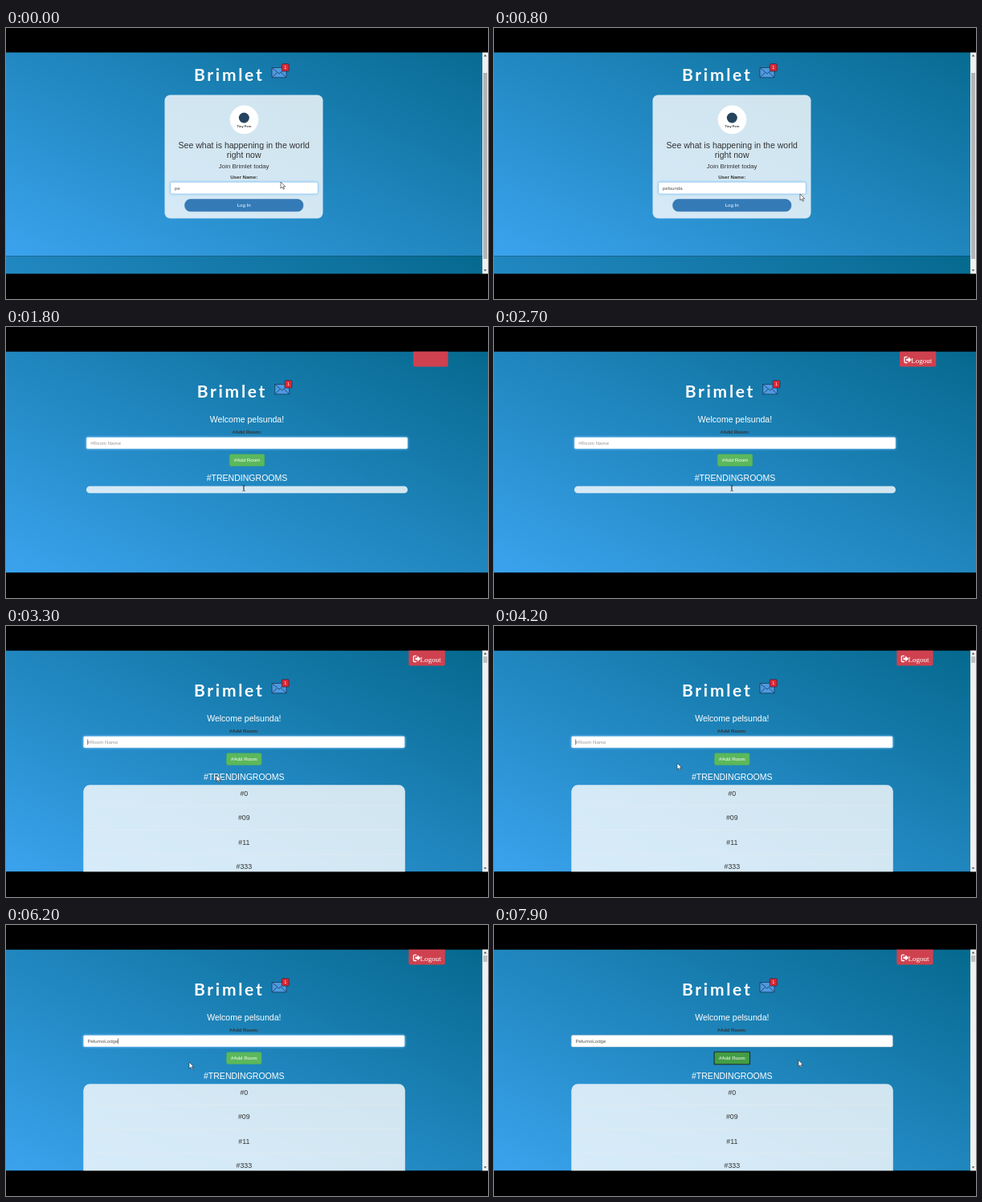
These frames come from a looping animation (600x338 px, 8 s). An HTML page:

```html
<!DOCTYPE html>
<html lang="en">
<head>
<meta charset="utf-8">
<title>Chat room sign-in</title>
<style>
  html, body { margin: 0; width: 100%; height: 100%; overflow: hidden; background: #000; }
  svg { display: block; width: 100vw; height: 100vh; }
  text { font-family: "Liberation Sans", Arial, sans-serif; font-size: 6.15px; fill: #333; }
  .mid { text-anchor: middle; }
  .bold { font-weight: 700; }
  .h3 { font-size: 10.54px; }
  .h4 { font-size: 7.9px; }
  .row { font-size: 8.8px; }
  .white { fill: #fff; }
  .brand { font: 700 21px Lato, sans-serif; letter-spacing: 2.7px; fill: #fff; }
  .logout { font: 9px "Liberation Serif", Times, serif; fill: #fff; }
  .panel { fill: #fff; fill-opacity: .8; }
  .field { fill: #fff; stroke: #ccc; stroke-width: .45; }
  .field.focus { stroke: #66afe9; filter: drop-shadow(0 0 1.4px rgba(130, 200, 250, .9)); }
  .value { fill: #555; }
  .value.empty { fill: #999; }
  .off { display: none; }
  #add rect { fill: #5cb85c; stroke: #4cae4c; stroke-width: .45; }
  #add.pressed rect { fill: #449d44; stroke: #255625; }
  #ring { fill: none; stroke: #1d2b22; stroke-width: .9; }
</style>
</head>
<body>
<svg viewBox="0 0 600 338">
  <defs>
    <linearGradient id="sky" x1="0" y1="1" x2="1" y2="0">
      <stop offset="0" stop-color="#3ba3ee"/>
      <stop offset="1" stop-color="#05698e"/>
    </linearGradient>

    <g id="brand">
      <text class="brand" x="234" y="66">Brimlet</text>
      <g stroke="#17395c" stroke-width=".8" stroke-linejoin="round">
        <path d="M331 49.5h18v12.3h-18z" fill="#4d9ae0"/>
        <path d="M331 61.8l6.5-6.3M349 61.8l-6.5-6.3M331 49.5l9 7.5 9-7.5" fill="none"/>
        <rect x="343.3" y="44.6" width="9" height="9.4" rx="1.5" fill="#e0242f"/>
      </g>
      <text class="mid white" x="347.8" y="51.3" style="font-size:5.5px">1</text>
    </g>

    <g id="track">
      <path d="M593 30h7v277h-7z" fill="#f1f1f1"/>
      <path d="M594.6 35.5l1.9-2.4 1.9 2.4zM594.6 301.2l1.9 2.4 1.9-2.4z" fill="#555"/>
    </g>

    <path id="arrow" d="M0 0v8l1.9-1.7 1.3 2.9 1.3-.6-1.3-2.8h2.5z"
          fill="#fff" stroke="#222" stroke-width=".6" stroke-linejoin="round"/>
    <path id="hand" d="M-1.2 4.6v-3.8a.8.8 0 0 1 1.6 0v2.7l3.2.6q1 .2 .9 1.3l-.5 3.6h-4.1l-2.5-3.3q-.2-1.3 1.4-1.1z"
          fill="#fff" stroke="#222" stroke-width=".6" stroke-linejoin="round"/>
    <path id="beam" d="M-1.6-3.5q1.6 0 1.6.7v5.6q0 .7-1.6.7M1.6-3.5q-1.6 0-1.6.7v5.6q0 .7 1.6.7"
          fill="none" stroke="#333" stroke-width=".7"/>
  </defs>

  <g id="login">
    <rect y="9" width="593" height="275.5" fill="url(#sky)"/>
    <rect y="284.5" width="593" height="275.5" fill="url(#sky)"/>
    <use href="#track"/>
    <path d="M594 56h5v232h-5z" fill="#b4b4b4"/>
    <use href="#brand"/>
    <rect class="panel" x="197.5" y="83.5" width="197" height="154" rx="7"/>
    <circle cx="296.5" cy="114.3" r="17.8" fill="#fff"/>
    <circle cx="296.3" cy="112" r="6.5" fill="#25445f"/>
    <text class="mid bold" x="296.5" y="123.6" style="font-size:4px">Tiny Fern</text>
    <g class="mid">
      <text class="h3" x="296.2" y="150">See what is happening in the world</text>
      <text class="h3" x="296.2" y="161.6">right now</text>
      <text class="h4" x="296.2" y="174.8">Join Brimlet today</text>
      <text class="bold" x="296.2" y="187.5">User Name:</text>
    </g>
    <rect class="field focus" x="204.7" y="192.2" width="183.6" height="14.7" rx="1.7"/>
    <text class="value" id="user" x="209.8" y="201.8"></text>
    <rect id="enter" x="222.5" y="213.6" width="147.5" height="15.2" rx="7" fill="#337ab7" stroke="#2e6da4" stroke-width=".45"/>
    <text class="mid white" x="296.2" y="223.4">Log In</text>
  </g>

  <g id="rooms">
    <rect id="wall" y="30.5" width="600" height="276" fill="url(#sky)"/>
    <g id="sidebar">
      <use href="#track"/>
      <path d="M594 38h5v8h-5z" fill="#c1c1c1"/>
    </g>
    <g id="page">
      <use href="#brand" x="3.7" y="22"/>
      <rect id="exit" y="29" height="20.4" rx="1.7" fill="#cf414f"/>
      <g id="exitLabel">
        <path d="M514.6 37.3h-2.6q-1 0-1 1v5.2q0 1 1 1h2.6" fill="none" stroke="#fff" stroke-width="1.3"/>
        <path d="M513.2 39.6h2.8v-2.3l3.8 3.6-3.8 3.6v-2.3h-2.8z" fill="#fff"/>
        <text class="logout" x="519.2" y="44.8">Logout</text>
      </g>
      <text class="h3 mid white" id="welcome" x="300" y="119.4">Welcome pelsunda!</text>
      <g id="form">
        <text class="mid bold" x="300" y="116.6">#Add Room:</text>
        <rect class="field" id="roomField" x="100" y="121.4" width="400" height="14.6" rx="1.7"/>
        <text class="value" id="room" x="105.2" y="130.8"></text>
        <path id="caret" d="M0 125.4v6.8" stroke="#222" stroke-width=".6"/>
        <g id="add">
          <rect x="278.2" y="142.7" width="43.6" height="14.7" rx="1.7"/>
          <path id="ring" d="M277.7 142.2h44.6v15.7h-44.6z" stroke-linejoin="round"/>
          <text class="mid white" x="300" y="152.3">#Add Room</text>
        </g>
        <text class="h3 mid white" x="300" y="176">#TRENDINGROOMS</text>
        <rect class="panel" id="bar" x="100" y="182.4" width="400" height="8.8" rx="4.3"/>
      </g>
      <g id="list">
        <rect class="panel" x="100" y="198.3" width="400.5" height="130" rx="8"/>
      </g>
    </g>
  </g>

  <path d="M0 0h600v30.4H0zM0 306.5h600V338H0z"/>
  <use id="pointer" href="#arrow"/>
</svg>

<script>
  const LOOP = 8000, STEP = 100;
  const USER = "pelsunda", ROOM = "PelumoLodge";
  const $ = id => document.getElementById(id);
  const show = (id, on) => $(id).classList.toggle("off", !on);

  // Pointer path: time, x, y, shape taken from that time on
  const path = [
    [0, 342, 192, "arrow"], [300, 342, 192, "arrow"], [700, 381, 207, "arrow"],
    [800, 381, 207, "arrow"], [1000, 293, 224, "hand"], [1400, 293, 224, "arrow"],
    [1800, 296, 201, "beam"], [2900, 296, 201, "arrow"], [3700, 228, 171, "arrow"],
    [6500, 228, 171, "arrow"], [7000, 301, 166, "hand"], [7300, 301, 166, "arrow"],
    [7800, 379, 168.5, "arrow"], [LOOP, 379, 168.5, "arrow"]
  ];

  function movePointer(t) {
    const i = path.findIndex(p => p[0] > t);
    const [t0, x0, y0, shape] = path[i - 1], [t1, x1, y1] = path[i];
    const k = (t - t0) / (t1 - t0), ease = k * k * (3 - 2 * k);
    $("pointer").setAttribute("href", "#" + shape);
    $("pointer").setAttribute("transform", `translate(${x0 + (x1 - x0) * ease} ${y0 + (y1 - y0) * ease})`);
  }

  function addRow(label, i) {
    const y = 212 + i * 30.4;
    $("list").insertAdjacentHTML("beforeend",
      `<text class="row mid" x="300" y="${y}">${label}</text>
       <path d="M103 ${y + 12}h394" stroke="#f3efe6" stroke-opacity=".5" stroke-width=".6"/>`);
  }
  ["#0", "#09", "#11", "#333"].forEach(addRow);

  function drawLogin(t) {
    $("user").textContent = USER.slice(0, 2 + Math.floor(t / 100));
    $("enter").setAttribute("fill", t >= 1000 ? "#286090" : "#337ab7");
  }

  function drawRooms(t) {
    const greeted = t >= 1500, iconReady = t >= 2000, listed = t >= 3200, clicked = t >= 7100;
    const focus = greeted && !clicked;

    show("sidebar", listed);
    show("list", listed);
    show("bar", !listed);
    $("wall").setAttribute("width", listed ? 593 : 600);
    $("page").setAttribute("transform", `translate(${listed ? -3.7 : 0} 0)`);

    const left = iconReady ? 505 : 507;
    $("exit").setAttribute("x", left);
    $("exit").setAttribute("width", 550.3 - left);
    show("exitLabel", iconReady);

    show("welcome", greeted);
    $("form").setAttribute("transform", `translate(0 ${greeted ? 16 : 0})`);
    $("roomField").classList.toggle("focus", focus);
    $("add").classList.toggle("pressed", clicked);
    show("ring", clicked);

    const typed = ROOM.slice(0, Math.max(0, Math.ceil((t - 4500) / 145)));
    const room = $("room");
    room.textContent = typed || "#Room Name";
    room.classList.toggle("empty", !typed);
    show("caret", focus && Math.floor(t / 500) % 2 === 0);
    const end = typed ? room.getComputedTextLength() : 0;
    $("caret").setAttribute("transform", `translate(${105.4 + end} 0)`);
  }

  function draw() {
    const t = Math.floor(performance.now() % LOOP / STEP) * STEP;
    const inside = t >= 1200;
    show("login", !inside);
    show("rooms", inside);
    if (inside) drawRooms(t); else drawLogin(t);
    movePointer(t);
    requestAnimationFrame(draw);
  }
  draw();
</script>
</body>
</html>
```
